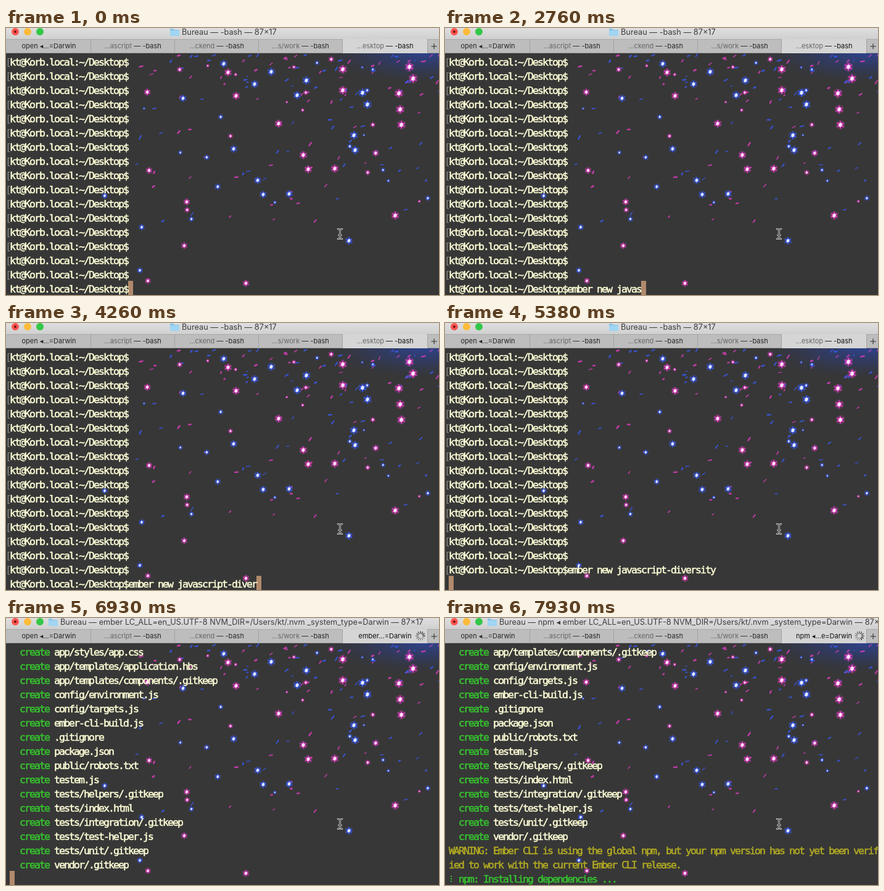
An HTML page with a canvas that plays this animation: 702x433 px, repeating every 7.99 s.

```html
<!DOCTYPE html>
<html lang="en">
<head>
<meta charset="utf-8">
<title>Terminal session</title>
<style>
html, body { margin: 0; width: 100%; height: 100%; overflow: hidden; background: #373737; }
#stage { position: absolute; left: 0; top: 0; width: 702px; height: 433px; overflow: hidden; }
canvas, svg { position: absolute; left: 0; top: 0; }
#bar { position: absolute; left: 0; top: 0; width: 702px; height: 18px; background: linear-gradient(#dedede, #d0d0d0); }
.dot { position: absolute; top: 0; width: 12px; height: 12px; border-radius: 50%; }
#title { position: absolute; top: -3px; white-space: pre; color: #3c3c3c; font: 12.75px/19px Inter, "Open Sans", sans-serif; }
#icon { overflow: visible; }
#tabs { position: absolute; left: 0; top: 18px; width: 702px; height: 23px; background: #bdbdbd; box-shadow: inset 0 1px #a9a9a9, inset 0 -1px #9c9c9c; }
.tab { position: absolute; top: 0; width: 136px; height: 23px; box-sizing: border-box; border-right: 1px solid #a2a2a2; text-align: center; white-space: pre; color: #262626; font: 11px/23px Inter, "Open Sans", sans-serif; }
.tab i { font-style: normal; color: #666; }
.tab.on { width: 138px; background: #d5d5d5; color: #111; }
#plus { position: absolute; left: 686px; top: 0; width: 16px; color: #555; font: 19px/21px Inter, sans-serif; text-align: center; }
#term { color: #ffffd8; font: 16.5px/23px "DejaVu Sans Mono", monospace; -webkit-text-stroke: .5px; font-variant-ligatures: none; }
.row { position: absolute; left: 6px; height: 23px; white-space: pre; }
.row b { font-weight: normal; color: #36c42f; }
.row u { text-decoration: none; color: #b3ab23; }
.row.mark::before { content: "["; position: absolute; left: -7px; color: #8c8c86; -webkit-text-stroke: 0; }
#cursor { position: absolute; width: 8px; height: 23px; background: #b18a6c; }
</style>
</head>
<body>
<div id="stage">
  <canvas id="sky" width="702" height="433"></canvas>
  <div id="cursor"></div>
  <div id="term"></div>
  <div id="bar">
    <div class="dot" style="left:9px;background:#fc5550"></div>
    <div class="dot" style="left:29px;background:#fdbb3c"></div>
    <div class="dot" style="left:49px;background:#33c748"></div>
    <div class="dot" style="left:13px;top:4px;width:4px;height:4px;background:#6b1210"></div>
    <svg id="icon" width="17" height="14">
      <path d="M1 1h5l2 2h8v10H1z" fill="#86c4e8"/><path d="M1 4h15v9H1z" fill="#a0d5f3"/>
    </svg>
    <div id="title"></div>
  </div>
  <div id="tabs"><div id="plus">+</div></div>
  <canvas id="live" width="702" height="433"></canvas>
  <svg width="702" height="433" fill="none" stroke-linecap="round">
    <defs><path id="beam" d="M538 326q3 0 3.500 2.500q.5-2.500 3.500-2.500M541.500 328v12M538 342q3 0 3.500-2.500q.5 2.500 3.500 2.500M539.500 336h4"/></defs>
    <use href="#beam" stroke="#ddd" stroke-width="2.6"/>
    <use href="#beam" stroke="#2a2a2a"/>
  </svg>
</div>
<script>
const LOOP = 7990, ROWS = 17, CELL = 8, LINE = 23, LEFT = 6, TOP = 42;
const $ = id => document.getElementById(id);

// ---- wallpaper ----
const BLUE = '58,92,255', PINK = '240,62,205';
const sky = $('sky').getContext('2d');

// the brightest stars; the others are scattered
const BRIGHT = {
  [BLUE]: [353,58, 430,71, 487,85, 472,109, 403,91, 287,114, 578,105, 586,124, 564,174, 566,198,
    369,196, 408,247, 417,270, 459,269, 217,393, 160,272, 220,323, 556,345],
  [PINK]: [360,72, 373,110, 442,155, 546,67, 546,101, 654,63, 660,82, 637,106, 639,132, 641,157,
    482,206, 490,229, 533,228, 232,231, 229,104, 289,353, 230,410, 389,414, 293,282, 631,304],
};

let seed = 11;
const rnd = () => (seed = seed * 16807 % 2147483647) / 2147483647;
const range = (a, b) => a + (b - a) * rnd();

function star(x, y, s, hue) {
  const reach = s * 1.5 + 1;
  const glow = sky.createRadialGradient(x, y, 0, x, y, reach);
  glow.addColorStop(0, `rgba(${hue},.9)`);
  glow.addColorStop(.6, `rgba(${hue},.35)`);
  glow.addColorStop(1, `rgba(${hue},0)`);
  sky.fillStyle = glow;
  sky.fillRect(x - reach, y - reach, reach * 2, reach * 2);
  sky.beginPath();
  for (let i = 0; i < 12; i++) {
    const a = (i + 1) * Math.PI / 6, r = i % 2 ? s * .55 : reach;
    sky.lineTo(x + r * Math.cos(a), y + r * Math.sin(a));
  }
  sky.fillStyle = `rgb(${hue})`;
  sky.fill();
  sky.beginPath();
  sky.ellipse(x, y, s * .55, s * .7, .35, 0, 7);
  sky.fillStyle = hue === BLUE ? '#e4ecff' : '#ffe4fa';
  sky.fill();
}

function dash(x, y, len, width, angle, hue) {
  const dx = Math.cos(angle) * len / 2, dy = Math.sin(angle) * len / 2;
  sky.strokeStyle = `rgba(${hue},.75)`;
  sky.lineWidth = width;
  sky.beginPath();
  sky.moveTo(x - dx, y - dy);
  sky.lineTo(x + dx, y + dy);
  sky.stroke();
}

function paintSky() {
  sky.fillStyle = '#373737';
  sky.fillRect(0, 0, 702, 433);
  sky.save();
  sky.translate(680, 40);
  sky.scale(1, .3);
  const haze = sky.createRadialGradient(0, 0, 0, 0, 0, 170);
  haze.addColorStop(0, 'rgba(42,72,180,.7)');
  haze.addColorStop(.5, 'rgba(42,62,140,.4)');
  haze.addColorStop(1, 'rgba(50,56,80,0)');
  sky.fillStyle = haze;
  sky.fillRect(-170, -170, 340, 340);
  sky.restore();

  sky.lineCap = 'round';
  const tint = () => rnd() < .55 ? BLUE : PINK;
  // dense towards the top right, thinning out below
  for (let i = 0; i < 120; i++)
    dash(702 - 490 * rnd() ** 1.2, 44 + 270 * rnd() ** 1.9, range(2, 6), range(1.3, 2.8), range(-1.1, 0), tint());
  for (let i = 0; i < 30; i++) star(range(210, 690), 44 + 290 * rnd() ** 1.5, range(1, 3.5), tint());
  for (const hue in BRIGHT) {
    const p = BRIGHT[hue];
    for (let i = 0; i < p.length; i += 2) star(p[i], p[i + 1], 3.2 + p[i] / 350 - p[i + 1] / 500, hue);
  }
}

// ---- window chrome ----
const NAMES = ['open ◂...=Darwin', '<i>...ascript</i> — -bash', '<i>...ckend</i> — -bash', '<i>...s/work</i> — -bash', ''];
const tabs = NAMES.map((name, i) => {
  const tab = document.createElement('div');
  tab.className = i === 4 ? 'tab on' : 'tab';
  tab.style.left = 2 + i * 136 + 'px';
  tab.innerHTML = name;
  $('tabs').append(tab);
  return tab;
});
const ENV = 'ember LC_ALL=en_US.UTF-8 NVM_DIR=/Users/kt/.nvm _system_type=Darwin — 87×17';
const TITLES = [
  [0, 285, 'Bureau — -bash — 87×17'],
  [5440, 88, 'Bureau — ' + ENV],
  [7510, 88, 'Bureau — npm ◂ ' + ENV]];
const TABS = [[0, '<i>...esktop</i> — -bash'], [5500, 'ember...=Darwin'], [7510, 'npm ◂...e=Darwin']];

// ---- terminal ----
const PROMPT = 'kt@Korb.local:~/Desktop$';
const KEY_GAP = 95;
const TYPING = [[400, 'em'], [1310, 'ber '], [1890, 'new '], [2350, 'javas'], [2930, 'cri'], [3330, 'pt-'],
  [3730, 'd'], [3900, 'ivers'], [4440, 'it'], [4790, 'y']];
const TYPO = [660, 1070], ENTER = 5380;
const FILES = `.editorconfig .ember-cli .eslintrc.js .travis.yml .watchmanconfig README.md app/app.js
app/components/.gitkeep app/controllers/.gitkeep app/helpers/.gitkeep app/index.html app/models/.gitkeep
app/resolver.js app/router.js app/routes/.gitkeep app/styles/app.css app/templates/application.hbs
app/templates/components/.gitkeep config/environment.js config/targets.js ember-cli-build.js .gitignore
package.json public/robots.txt testem.js tests/helpers/.gitkeep tests/index.html tests/integration/.gitkeep
tests/test-helper.js tests/unit/.gitkeep vendor/.gitkeep`.split(/\s+/);
const OUTPUT = ['<b>installing app</b>', ...FILES.map(f => `  <b>create</b> ${f}`)];
const PRINT = 6760, WARN = 7390;
const WARNING = ['WARNING: Ember CLI is using the global npm, but your npm version has not yet been verif',
  'ied to work with the current Ember CLI release.'].map(s => `<u>${s}</u>`);
const SPIN = 5880, DOTS = '⠋⠙⠹⠸⠼⠴⠦⠧⠇⠏';

const at = (steps, t) => steps.filter(s => s[0] <= t).pop();

function typed(t) {
  const keys = TYPING.map(([from, text]) => text.slice(0, Math.max(0, Math.floor((t - from) / KEY_GAP) + 1)));
  return keys.join('') + (t >= TYPO[0] && t < TYPO[1] ? 'n' : '');
}

// files arrive in three quick bursts after the first line
function printed(t) {
  if (t < PRINT) return 0;
  const burst = Math.min(3, Math.floor((t - PRINT) / 56));
  return 1 + Math.round(FILES.length * burst / 3);
}

function screen(t) {
  const lines = Array(16).fill(PROMPT);
  lines.push(PROMPT + typed(t));
  let col = lines[16].length;
  if (t >= ENTER) {
    lines.push(...OUTPUT.slice(0, printed(t)));
    if (t >= WARN) lines.push(...WARNING, '<b>  npm: Installing dependencies ...</b>');
    else lines.push('');
    col = t >= WARN ? -1 : 0;
  }
  return { lines: lines.slice(-ROWS), col };
}

const rows = Array.from({ length: ROWS }, (_, i) => {
  const row = document.createElement('div');
  row.className = 'row';
  row.style.top = TOP + 2 + i * LINE + 'px';
  $('term').append(row);
  return row;
});

// tight tracking puts every glyph on the 8px grid
function setTracking() {
  const probe = document.createElement('span');
  probe.className = 'row';
  probe.textContent = 'e'.repeat(80);
  $('term').append(probe);
  const width = probe.getBoundingClientRect().width / 80;
  probe.remove();
  $('term').style.letterSpacing = CELL - width + 'px';
}

// ---- moving parts ----
const live = $('live').getContext('2d');

function wheel(step) {
  live.lineCap = 'round';
  live.lineWidth = 1.5;
  for (let i = 0; i < 12; i++) {
    const a = i * Math.PI / 6 - Math.PI / 2, age = (step - i + 1200) % 12;
    live.strokeStyle = `rgba(40,40,40,${.9 - age * .055})`;
    live.beginPath();
    live.moveTo(672 + 4 * Math.cos(a), 29 + 4 * Math.sin(a));
    live.lineTo(672 + 7.2 * Math.cos(a), 29 + 7.2 * Math.sin(a));
    live.stroke();
  }
}

function braille(char) {
  const bits = char.charCodeAt(0) - 0x2800;
  live.fillStyle = '#36c42f';
  for (let i = 0; i < 6; i++)
    if (bits >> i & 1) live.fillRect(i < 3 ? 9 : 12, 418 + i % 3 * 4, 2, 2);
}

const cache = new Map();
function put(el, html) {
  if (cache.get(el) === html) return;
  cache.set(el, html);
  el.innerHTML = html;
}

function render(t) {
  const { lines, col } = screen(t);
  rows.forEach((row, i) => {
    put(row, lines[i]);
    row.classList.toggle('mark', lines[i].startsWith(PROMPT) && (i < 16 || t >= ENTER));
  });
  const cursor = $('cursor').style;
  cursor.display = col < 0 ? 'none' : 'block';
  cursor.left = LEFT + col * CELL + 'px';
  cursor.top = TOP + 16 * LINE + 'px';

  const [, x, text] = at(TITLES, t);
  put($('title'), text);
  $('title').style.left = x + 'px';
  $('icon').style.left = x - 20 + 'px';
  put(tabs[4], at(TABS, t)[1]);

  live.clearRect(0, 0, 702, 433);
  if (t >= SPIN) wheel(Math.floor((t - SPIN) / 69));
  if (t >= WARN) braille(DOTS[Math.floor((t - WARN) / 63) % 10]);
}

paintSky();
setTracking();
const start = performance.now();
function tick() {
  render((performance.now() - start) % LOOP);
  requestAnimationFrame(tick);
}
tick();
</script>
</body>
</html>
```
